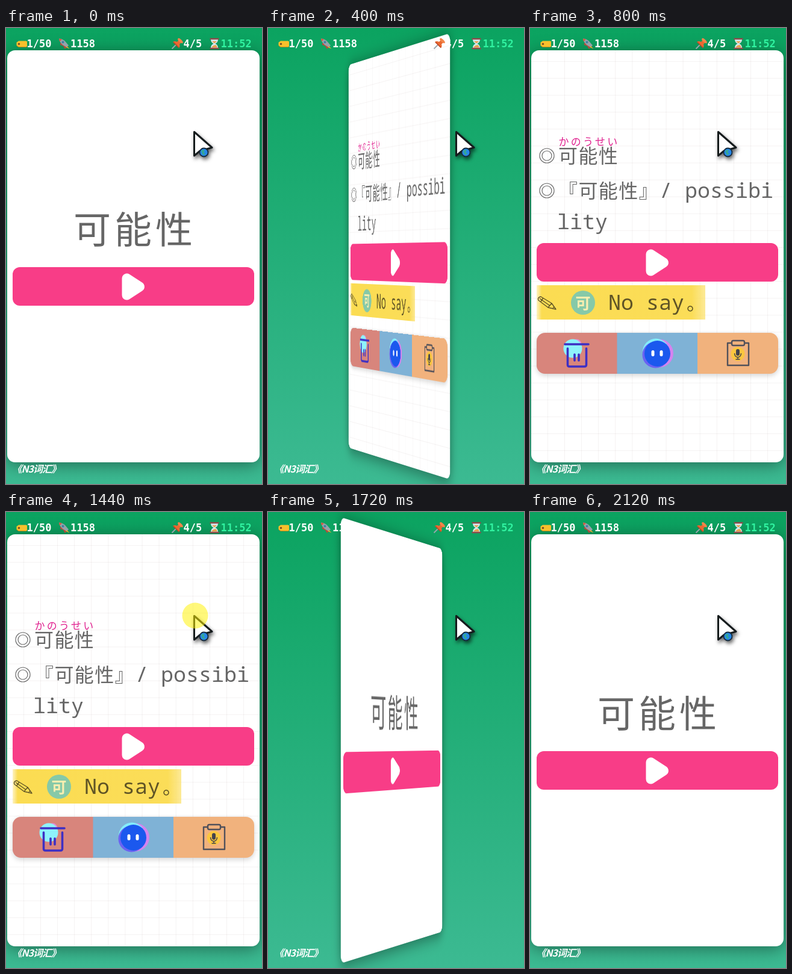
Write an HTML page that moves like this. It is 425x757 px and loops after 2360 ms.

```html
<!DOCTYPE html>
<html lang="zh">
<head>
<meta charset="utf-8">
<title>Flashcard</title>
<style>
  html, body { margin: 0; width: 100%; height: 100%; overflow: hidden; }
  body { position: relative; background: linear-gradient(#0ba360, #3cba92); }
  svg { position: absolute; display: block; }
  .face {
    left: 2px; top: 37px; width: 419px; height: 684px;
    border-radius: 13px; background-color: #fff;
    box-shadow: 0 4px 29px rgba(0, 0, 0, .43);
  }
  #back {
    background-image:
      linear-gradient(90deg, rgba(50, 0, 0, .05) 1px, transparent 1px),
      linear-gradient(0deg, rgba(50, 0, 0, .05) 1px, transparent 1px);
    background-size: 28.1px 28.1px;
    background-position: center;
  }
  #hud { left: 0; top: 0; width: 425px; height: 757px; }
  .cjk { font-family: "Noto Sans CJK SC", "Noto Sans CJK JP", "Noto Sans CJK", sans-serif; fill: #666; }
  .mono { font: 35px "Noto Sans Mono", monospace; fill: #666; white-space: pre; }
  .stat { font: bold 17px "DejaVu Sans Mono", monospace; fill: #fff; }
</style>
</head>
<body>

<svg id="front" class="face" viewBox="2 37 419 684">
  <text class="cjk" x="112" y="357.5" font-size="62" letter-spacing="6">可能性</text>
  <g id="play">
    <rect x="11" y="397" width="401" height="64" rx="12" fill="#f83d87"/>
    <path d="M200.500 415.500V443.500L222 429.500Z" fill="#fff" stroke="#fff" stroke-width="16" stroke-linejoin="round"/>
  </g>
</svg>

<svg id="back" class="face" viewBox="2 37 419 684">
  <defs>
    <linearGradient id="marker">
      <stop offset="0" stop-color="#fbdc52" stop-opacity=".35"/>
      <stop offset=".03" stop-color="#fbdc52"/>
      <stop offset=".92" stop-color="#fbdd58"/>
      <stop offset="1" stop-color="#fbdc52" stop-opacity=".6"/>
    </linearGradient>
    <clipPath id="bar"><rect x="11" y="506" width="401" height="68" rx="14"/></clipPath>
    <filter id="soft" x="-10%" y="-30%" width="120%" height="160%"><feGaussianBlur stdDeviation="4"/></filter>
  </defs>

  <g fill="none" stroke="#666" stroke-width="1.200">
    <circle cx="28" cy="212" r="12"/><circle cx="28" cy="212" r="8"/>
    <circle cx="28" cy="270" r="12"/><circle cx="28" cy="270" r="8"/>
  </g>
  <text class="cjk" x="47.500" y="194.500" font-size="17" letter-spacing="3.200" style="fill:#e0218f">かのうせい</text>
  <text class="cjk" x="47" y="224" font-size="32" letter-spacing="1.400">可能性</text>
  <text class="cjk" x="47" y="282" font-size="32" letter-spacing="1.400">『可能性』</text>
  <text class="mono" x="215" y="282">/ possibi</text>
  <text class="mono" x="45" y="334">lity</text>

  <use href="#play" y="-40"/>

  <rect x="11" y="427" width="280" height="57" fill="url(#marker)"/>
  <path d="M43 467L30 464L14 452Q12 447 18 446L36 457ZM36 457L30 464M38 466L40 462M16 449L33 461M18 454L22 448"
    fill="none" stroke="#5f5426" stroke-width="1.400" stroke-linejoin="round"/>
  <circle cx="88" cy="456" r="20" fill="#86c9a8"/>
  <text class="cjk" x="88" y="465.500" font-size="25" font-weight="900" text-anchor="middle" style="fill:#fbeeb0">可</text>
  <text class="mono" x="130" y="468" style="fill:#5f5426">No say</text>
  <text class="cjk" x="260" y="468" font-size="31" style="fill:#5f5426">。</text>

  <rect x="11" y="509" width="401" height="68" rx="14" opacity=".17" filter="url(#soft)"/>
  <g clip-path="url(#bar)">
    <path d="M11 506H145V574H11Z" fill="#d8857c"/>
    <path d="M144.500 506H279V574H144.500Z" fill="#7fb2d6"/>
    <path d="M278 506H413V574H278Z" fill="#f1b27d"/>
  </g>

  <circle cx="77" cy="525" r="8.500" fill="#e58ad8"/>
  <circle cx="71" cy="532" r="15.500" fill="#8ef3fb"/>
  <path d="M58 525H97M62.500 532V559Q62.500 562 65.500 562H90.500Q93.500 562 93.500 559V532M74 542V552M81 542V552"
    fill="none" stroke="#3d2fc4" stroke-width="3.600" stroke-linecap="round" stroke-linejoin="round"/>

  <circle cx="214.500" cy="540" r="23.500" fill="#d483ef"/>
  <circle cx="209" cy="537.500" r="22" fill="#83edfb"/>
  <circle cx="208.500" cy="542.500" r="22" fill="#6a63f2"/>
  <circle cx="211.500" cy="540.500" r="21.500" fill="#1b58ee"/>
  <rect x="201.500" y="535" width="5" height="10" rx="2.500" fill="#fff"/>
  <rect x="215.500" y="535" width="5" height="10" rx="2.500" fill="#fff"/>

  <g fill="none" stroke="#50505a" stroke-width="2.400" stroke-linejoin="round">
    <path d="M335 523H328V560H363V523H356"/>
    <rect x="335" y="519" width="21" height="8" rx="2.500"/>
  </g>
  <circle cx="345" cy="541" r="11.500" fill="#fbc63f"/>
  <rect x="342" y="533" width="6" height="11" rx="3" fill="#43434d"/>
  <path d="M339.500 540Q340 546.500 345 546.500T350.500 540M345 546.500V550M341.500 550H348.500" fill="none" stroke="#43434d" stroke-width="1.500"/>
</svg>

<svg id="hud" viewBox="0 0 425 757">
  <defs>
    <filter id="drop" x="-40%" y="-30%" width="200%" height="180%">
      <feDropShadow dx="2" dy="4" stdDeviation="3" flood-color="#000" flood-opacity=".6"/>
    </filter>
  </defs>

  <path d="M17.500 24L21 21.500H33.500Q35 21.500 35 23V30Q35 31.500 33.500 31.500H21L17.500 29Z" fill="#f8c02c"/>
  <path d="M18 29.500L21 31.500H34" fill="none" stroke="#c98a1b"/>
  <circle cx="21.500" cy="26.500" r="1.700" fill="#7a4a24"/>
  <text class="stat" x="34.500" y="32">1/50</text>

  <path d="M90 25L96 25L101 31L98 35L95 30L90 28Z" fill="#b8493b"/>
  <path d="M88 17.500Q95 18 99 23L104 29L100.500 32L94 28Q88.500 23 88 17.500Z" fill="#93a3aa"/>
  <path d="M88 17.500L93 18.800L89 22.500Z" fill="#d9583f"/>
  <circle cx="94.500" cy="23.500" r="2" fill="#3f7fa3"/>
  <path d="M101 30L105.500 34.500L99.500 32Z" fill="#f7a928"/>
  <text class="stat" x="107" y="32">1158</text>

  <path d="M283 27L275.500 34.500" stroke="#9aa6ad" stroke-width="1.800"/>
  <path d="M277 23Q280 21 284 23L288 19L292 23L288 27Q289.500 31 287 33Z" fill="#ea6a32"/>
  <path d="M285.500 17.500Q287 15.500 291 19.500T293.500 25Q291 26 287.500 22.500T285.500 17.500Z" fill="#f2854a"/>
  <path d="M278 23.500L287 32.500" stroke="#bd4526" stroke-width="1.500"/>
  <text class="stat" x="294.500" y="32">4/5</text>

  <path d="M340 19H352Q352 24 347.500 26Q352 28 352 33H340Q340 28 344.500 26Q340 24 340 19Z" fill="#d5e6ec"/>
  <path d="M342 22H350L346 25.500ZM341.500 32.500Q342 30 346 28.500T350.500 32.500Z" fill="#e9a14c"/>
  <path d="M338.500 18H353.500M338.500 34H353.500" stroke="#8d4b4b" stroke-width="2.400"/>
  <text class="stat" x="356.500" y="32" style="fill:#30f2a0">11:52</text>

  <text class="cjk" x="10.500" y="737.500" font-size="16" font-weight="bold" font-style="italic" letter-spacing="-1" style="fill:#fff">《N3词汇》</text>

  <g filter="url(#drop)">
    <path d="M312.500 172.500V212L322 204L342 198.500Z" fill="#fff" stroke="#141a1f" stroke-width="3" stroke-linejoin="round"/>
    <circle cx="328.500" cy="206.500" r="7" fill="#2587e8" stroke="#152a3c" stroke-width="1.800"/>
    <path d="M324 204Q327 201 330 203L328 206L331 209L327 211Z" fill="#36a894"/>
  </g>
  <circle id="tap" cx="314" cy="172" r="21.500" fill="#fff200" fill-opacity=".52"/>
</svg>

<script>
  const LOOP = 2360, SECOND_TAP = 1440, SHIFT = 1320;
  const TICK = 200 / 3, GRID = 40;
  const FLIP_START = 167, FLIP_TIME = 570;
  const [front, back, tap] = ["front", "back", "tap"].map(id => document.getElementById(id));

  // cubic-bezier(.4, 0, .2, 1)
  function ease(x) {
    if (x <= 0) return 0;
    if (x >= 1) return 1;
    const curve = (a, b, s) => 3 * (1 - s) ** 2 * s * a + 3 * (1 - s) * s * s * b + s ** 3;
    let lo = 0, hi = 1;
    for (let i = 0; i < 24; i++) {
      const mid = (lo + hi) / 2;
      if (curve(.4, .2, mid) < x) lo = mid; else hi = mid;
    }
    return curve(0, 1, lo);
  }

  // The picture steps at 15 per second, on a 40 ms grid.
  function tickAt(ms) {
    let k = Math.floor(ms / TICK) + 1;
    while (k > 0 && Math.round(k * TICK / GRID) * GRID > ms) k--;
    return k;
  }

  function turn(face, deg) {
    face.style.transform = deg ? `perspective(2500px) rotateY(${deg}deg)` : "none";
  }

  function draw(ms) {
    const closing = ms >= SECOND_TAP;
    const tick = tickAt(closing ? ms - SHIFT : ms);
    const p = ease((tick * TICK - FLIP_START) / FLIP_TIME);
    const angle = 180 * (closing ? 1 - p : p);
    const showFront = angle < 90;
    front.style.visibility = showFront ? "visible" : "hidden";
    back.style.visibility = showFront ? "hidden" : "visible";
    turn(front, angle);
    turn(back, angle - 180);
    tap.style.visibility = tick === 2 ? "visible" : "hidden";
  }

  const start = performance.now();
  function frame() {
    draw((performance.now() - start) % LOOP);
    requestAnimationFrame(frame);
  }
  frame();
</script>
</body>
</html>
```
